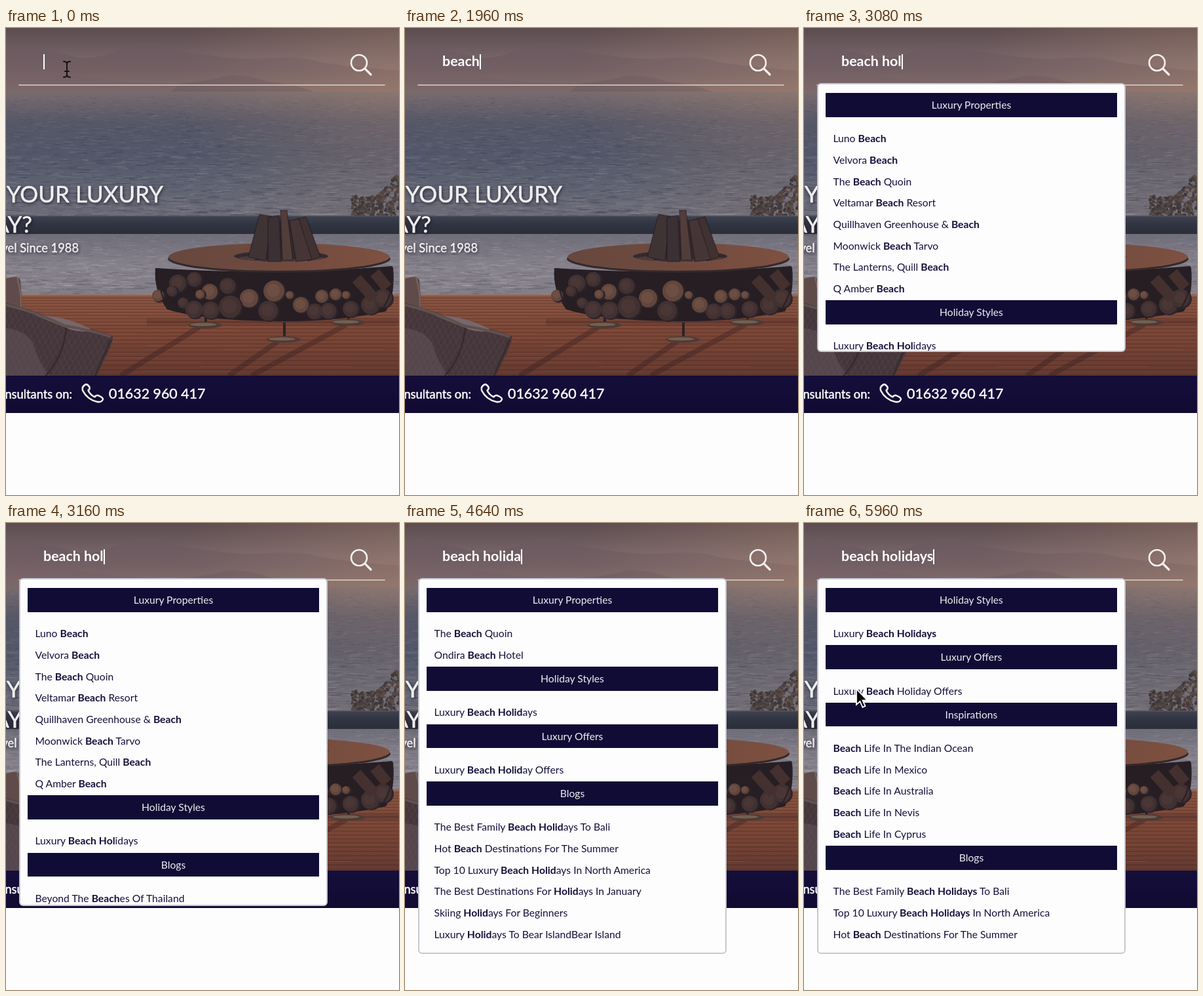
An HTML page with a canvas for the animation above (6000 ms loop, 600 by 712 pixels).

```html
<!DOCTYPE html>
<html lang="en">
<head>
<meta charset="utf-8">
<title>Holiday search</title>
<style>
  html, body { margin: 0; width: 600px; height: 712px; overflow: hidden; background: #fefdfe; }
  body { position: relative; font-family: Lato, "Open Sans", sans-serif; }
  body > * { position: absolute; left: 0; top: 0; }
  text { fill: #fff; stroke: #fff; stroke-width: .45px; }
  .hero { text-shadow: 1px 2px 4px rgba(20, 15, 30, .6); }
  #query { left: 57px; top: 39.5px; height: 23px; border-right: 2px solid #fff; color: #fff;
    font-size: 21.4px; font-weight: 700; line-height: 20px; white-space: pre; }
  #panel { left: 20px; top: 84px; width: 471px; box-sizing: border-box; overflow: hidden;
    padding: 13px 11px 0; border: 2px solid #c8c8d0; border-radius: 6px;
    background: #fefdfe; color: #14103a; font-size: 15.7px; white-space: nowrap; }
  #panel h2 { margin: 1.65px 0 16.65px; height: 36.5px; background: #110c36; color: #eeedf2;
    font-size: inherit; font-weight: 400; line-height: 36.5px; text-align: center; }
  #panel h2:first-child { margin-top: 0; }
  #panel p { margin: 0 0 0 11.5px; height: 32.7px; line-height: 32.7px; }
</style>
</head>
<body>
<canvas id="scene" width="600" height="587"></canvas>
<svg width="600" height="712" fill="none" stroke-linecap="round" stroke-linejoin="round">
  <path d="M20 87H578" stroke="#ddd4cf" stroke-width="1.6"/>
  <g stroke="#f4efee" stroke-width="2.6">
    <circle cx="539" cy="53" r="12"/>
    <path d="M548 62L557 71" stroke-width="3.2"/>
    <path d="M121.500 543.500q-6 3-4.500 9q7 14 22.500 17.500q7 1 8.500-4q0-3-8-6q-3 0-4.500 2.500q-7-3-10-10q3-2 2-5q-3-5-6-4z"/>
  </g>
  <g text-anchor="end">
    <g class="hero">
      <text x="240" y="266" font-size="35">YOUR LUXURY</text>
      <text x="40" y="312" font-size="35">AY?</text>
      <text x="111" y="342" font-size="18.3">vel Since 1988</text>
    </g>
    <text x="101" y="565" font-size="18.3">nsultants on:</text>
  </g>
  <text x="157" y="565" font-size="21.4">01632 960 417</text>
</svg>
<div id="query"></div>
<div id="panel"></div>
<svg id="pointer" width="40" height="40" overflow="visible">
  <path id="beam" d="M-5-12Q0-12 0-8V8Q0 12-5 12M5-12Q0-12 0-8M0 8Q0 12 5 12M-3 3H3"
    fill="none" stroke="#151214" stroke-width="2" stroke-linecap="round"/>
  <path id="arrow" d="M0 0V24L5.500 19L9.500 28L13.500 26L9.500 17.500H17Z" fill="#080808" stroke="#fff" stroke-width="1.8"/>
</svg>
<script>
const $ = id => document.getElementById(id);

// Static backdrop
const g = $('scene').getContext('2d');
let seed = 11;
const rnd = (a = 0, b = 1) => a + (b - a) * ((seed = seed * 16807 % 2147483647) / 2147483647);
const blend = (x0, y0, x1, y1, colors) => {
  const f = g.createLinearGradient(x0, y0, x1, y1);
  colors.forEach((c, i) => f.addColorStop(i / (colors.length - 1), c));
  return f;
};
const fade = (y0, y1, ...colors) => blend(0, y0, 0, y1, colors);
const across = (x0, x1, ...colors) => blend(x0, 0, x1, 0, colors);
const rect = (c, x, y, w, h) => { g.fillStyle = c; g.fillRect(x, y, w, h); };
const shape = (c, d) => { g.fillStyle = c; g.fill(new Path2D(d)); };
const line = (c, w, d) => { g.strokeStyle = c; g.lineWidth = w; g.stroke(new Path2D(d)); };
const oval = (c, x, y, rx, ry = rx) => {
  g.fillStyle = c;
  g.beginPath();
  g.ellipse(x, y, rx, ry, 0, 0, 7);
  g.fill();
};
const ripples = (n, y0, y1, light, dark) => {
  for (let i = 0; i < n; i++) {
    const y = rnd(y0, y1), size = .5 + (y - y0) / (y1 - y0);
    rect(i % 2 ? light : dark, rnd(-20, 600), y, rnd(5, 20) * size, size);
  }
};

function drawSea() {
  rect(fade(0, 100, '#5c4c4f', '#78666a', '#89746f'), 0, 0, 600, 100);
  shape(fade(25, 100, '#6a5a60', '#725f64', '#846f6c'),
    'M0 27Q60 29 105 44Q135 49 165 36Q200 22 235 25Q265 37 310 41Q350 49 400 46Q450 42 480 52Q530 60 600 65V100H0Z');
  shape('#745f6466', 'M0 70Q60 67 130 76T260 84Q310 79 340 72Q372 71 400 82Q440 85 472 98H0Z');
  shape('#6d5c6299', 'M265 86Q315 80 340 72Q372 71 400 82Q440 85 472 98H250Z');
  rect(fade(97, 287, '#786b6e', '#565767', '#525769', '#5e6271', '#6e6d79'), 0, 97, 600, 190);
  ripples(2200, 103, 287, 'rgba(160,153,165,.2)', 'rgba(40,44,64,.2)');
  const glow = g.createRadialGradient(600, 70, 0, 600, 70, 330);
  glow.addColorStop(0, 'rgba(190,145,115,.3)');
  glow.addColorStop(1, 'rgba(190,145,115,0)');
  rect(glow, 0, 0, 600, 300);
}

function drawTerrace() {
  for (let i = 0; i < 330; i++) {
    const x = rnd(528, 602), top = 256 - Math.max(0, x - 568) * 1.1;
    oval(['#4a403f', '#5a4b45', '#3d383c'][i % 3], x, rnd(top, 287), rnd(1, 3));
  }
  rect(fade(286, 315, '#3f4250', '#303340', '#2b2d3a'), 0, 286, 600, 29);
  rect('#52545f', 0, 286, 600, 1.5);
  rect(fade(314, 408, '#6f6d79', '#85818b', '#837e87'), 0, 314, 600, 94);
  ripples(1300, 316, 406, 'rgba(190,183,193,.24)', 'rgba(72,72,90,.22)');
  rect(fade(406, 530, '#8b5542', '#7b4636', '#643a31'), 0, 406, 600, 124);
  rect('#93705f', 0, 406, 600, 2);
  for (let y = 411; y < 530; y += 4 + (y - 406) / 35) {
    rect('rgba(45,22,24,.3)', 0, y, 600, 1.1);
    rect('rgba(165,95,68,.2)', rnd(0, 350), y + 2, rnd(100, 250), 1.5);
  }
  rect(fade(440, 456, 'rgba(45,27,30,0)', 'rgba(45,27,30,.3)', 'rgba(45,27,30,0)'), 215, 440, 385, 16);
  line('rgba(50,27,30,.35)', 8, 'M295 456L175 530M415 478L340 530M520 452L375 530');
}

function drawFirePit() {
  for (const [x, y] of [[305, 453], [425, 475], [523, 449]]) {
    rect('#2c2326', x - 2, y - 26, 4, 26);
    oval('#4c3b38', x - 1, y, 26, 5);
    oval('#74604f', x - 4, y - 1, 20, 2.5);
  }
  shape('#261e23', 'M228 366Q410 378 590 363Q596 404 580 432Q500 449 410 447Q300 446 246 429Q225 400 228 366Z');
  const logs = [
    [311, 402, 12], [371, 412, 14], [409, 401, 16], [450, 422, 12], [482, 409, 10], [232, 408, 9], [296, 406, 7], [503, 406, 9],
    [433, 407, 6], [519, 407, 6], [287, 383, 11], [262, 389, 13], [270, 419, 8], [253, 401, 8], [287, 429, 13], [312, 430, 13],
    [342, 425, 17], [338, 393, 12], [400, 431, 15], [471, 432, 12], [492, 431, 12], [526, 428, 12], [556, 422, 14], [575, 412, 14]];
  logs.forEach(([x, y, r], i) => {
    const bright = i < 10;
    oval('#2e2428', x + 2, y + 1, r + 1);
    oval(bright ? '#61463e' : '#423133', x, y, r);
    oval(bright ? '#6d4e43' : '#493635', x - 1, y - 1, r * .65);
  });
  line('#43302f', 17, 'M535 382L562 412M563 373L582 396');
  line('#2a2026', 2, 'M234 366Q232 412 252 428M590 365Q594 400 574 430');
  oval('#34292d', 417, 352, 170, 21);
  oval(across(247, 587, '#67473e', '#704a3e', '#7f5141'), 417, 349, 169, 21);
  oval('#332a2f', 420, 348, 72, 8);
  oval('#4d3b3a', 420, 351, 65, 5);
  const sticks = ['M370 349L387 284L405 287L397 355Z', 'M445 291L458 288L480 349L461 355Z',
    'M419 278L429 278L438 354H422Z', 'M433 294L447 291L467 353L443 356Z', 'M400 289L417 286L420 356H400Z'];
  shape('#342a2e', 'M384 296L455 292L470 352L380 354Z');
  sticks.forEach((d, i) => {
    shape(['#3f3336', '#403133', '#523d3a', '#463537', '#3b3034'][i], d);
    line('rgba(30,22,27,.45)', 1.5, d);
  });
}

function drawChair() {
  const body = 'M0 419Q48 432 92 451Q141 460 163 470Q166 478 138 530H0Z';
  shape('#5f4b49', 'M0 382Q17 376 22 384L25 428L0 420Z');
  line('#7a645e', 2, 'M17 381Q23 400 23 427');
  shape('#44363b', body);
  shape('#76686b', 'M45 438Q90 438 129 459Q125 466 99 460Z');
  shape('#54464c', 'M0 458Q25 459 41 479Q50 510 66 530H0Z');
  g.save();
  g.clip(new Path2D(body));
  for (let x = -110; x < 180; x += 9) {
    line('rgba(115,94,92,.2)', 1.2, `M${x} 530L${x + 75} 420M${x} 420L${x + 50} 530`);
  }
  g.restore();
  line('#615050', 4, 'M0 422Q48 434 90 454Q136 462 160 471');
  line('#382c31', 3, 'M160 475L136 530M92 457Q88 500 61 530');
}

drawSea();
drawTerrace();
drawFirePit();
drawChair();
rect(fade(530, 587, '#140e3a', '#110b33'), 0, 530, 600, 57);

// Search results; a leading # marks a section title
const bali = 'The Best Family Beach Holidays To Bali';
const summer = 'Hot Beach Destinations For The Summer';
const america = 'Top 10 Luxury Beach Holidays In North America';
const styles = ['#Holiday Styles', 'Luxury Beach Holidays'];
const offers = ['#Luxury Offers', 'Luxury Beach Holiday Offers'];
const broad = ['#Luxury Properties', 'Luno Beach', 'Velvora Beach', 'The Beach Quoin', 'Veltamar Beach Resort',
  'Quillhaven Greenhouse & Beach', 'Moonwick Beach Tarvo', 'The Lanterns, Quill Beach', 'Q Amber Beach',
  ...styles, '#Blogs', 'Beyond The Beaches Of Thailand', bali, summer];
const narrow = ['#Luxury Properties', 'The Beach Quoin', 'Ondira Beach Hotel', ...styles, ...offers,
  '#Blogs', bali, summer, america, 'The Best Destinations For Holidays In January',
  'Skiing Holidays For Beginners', 'Luxury Holidays To Bear IslandBear Island'];
const exact = [...styles, ...offers, '#Inspirations',
  ...['The Indian Ocean', 'Mexico', 'Australia', 'Nevis', 'Cyprus'].map(p => 'Beach Life In ' + p),
  '#Blogs', bali, america, summer];

const OPEN = 2960;
const results = [[OPEN, 'Hol', broad], [4000, 'Holid', narrow], [4840, 'Holida', narrow],
  [5120, 'Holiday', narrow], [5360, 'Holidays', exact]];
const phrase = 'beach holidays';
const keys = [680, 880, 1240, 1480, 1720, 2080, 2360, 2560, 2760, 3440, 3760, 4320, 4720, 5080];

const listHtml = (word, rows) => rows.map(row => {
  if (row[0] === '#') return `<h2>${row.slice(1)}</h2>`;
  const text = row.replace('&', '&amp;').replace(new RegExp(`Beach|${word}`, 'g'), '<b>$&</b>');
  return `<p>${text}</p>`;
}).join('');

let shown;
function render() {
  const t = performance.now() % 6000;
  $('query').textContent = phrase.slice(0, keys.filter(k => t >= k).length);

  const result = results.filter(r => t >= r[0]).pop();
  if (result !== shown) {
    shown = result;
    $('panel').innerHTML = result ? listHtml(result[1], result[2]) : '';
  }
  $('panel').style.display = result ? '' : 'none';
  $('panel').style.height = 573 - 546 * Math.exp((OPEN - t) / 100) + 'px';

  // The pointer hides while typing, then glides down to the results
  const p = Math.min(1, Math.max(0, (t - 5520) / 400));
  const move = p * p * (3 - 2 * p);
  const x = 93 - 13 * move, y = 63 + 190 * move;
  $('pointer').style.transform = `translate(${x}px, ${y}px)`;
  $('pointer').style.display = t < keys[0] || t >= 5520 ? '' : 'none';
  $('beam').style.display = y < 84 ? '' : 'none';
  $('arrow').style.display = y < 84 ? 'none' : '';
  requestAnimationFrame(render);
}
render();
</script>
</body>
</html>
```
